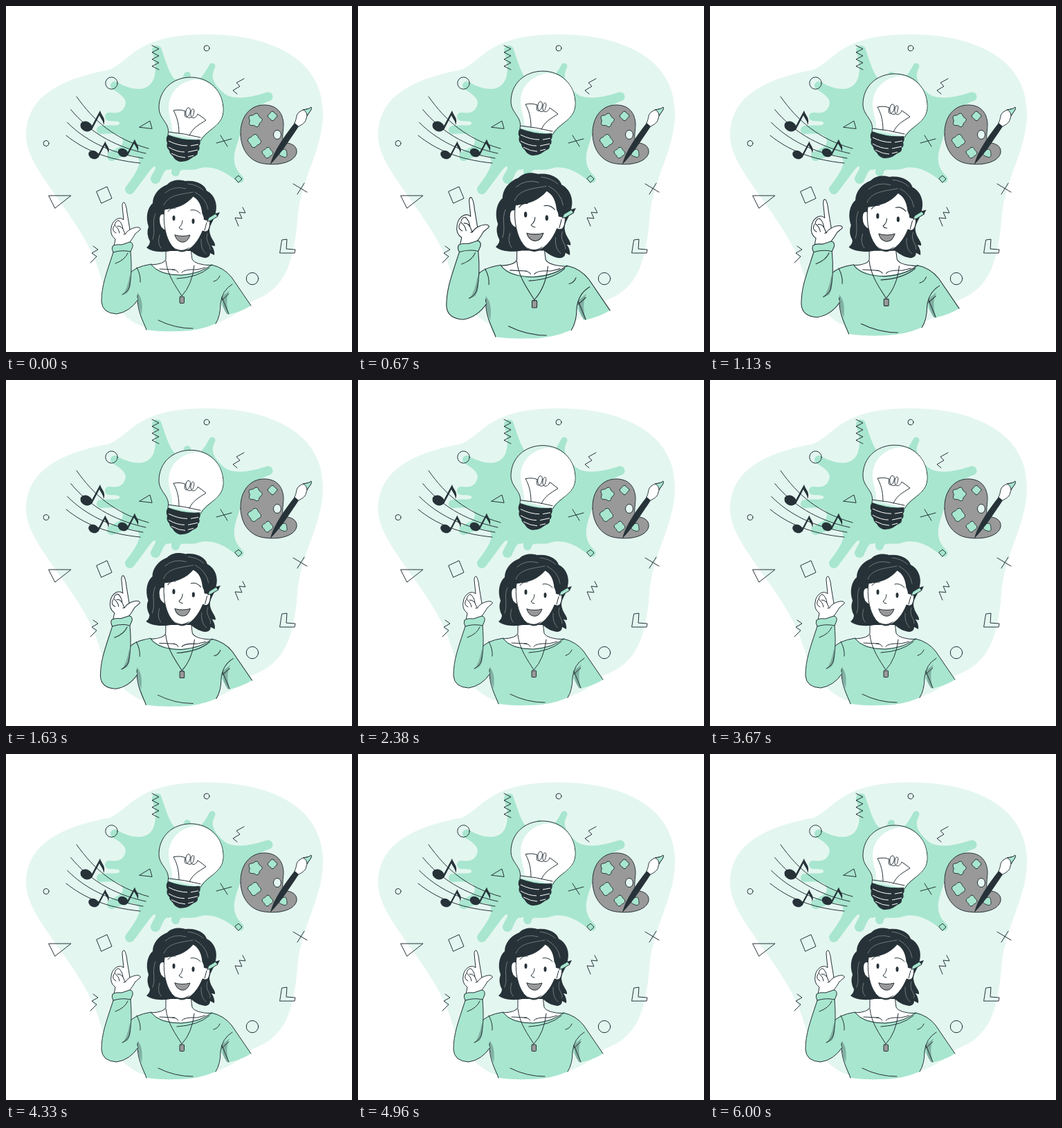
Animation of 500 by 500 pixels, one loop 6040 ms. Source, as an HTML page:

```html
<!DOCTYPE html>
<html lang="en">
<head>
<meta charset="utf-8">
<title>Creative idea</title>
<style>
  html, body { margin: 0; width: 100%; height: 100%; overflow: hidden; background: #fff; }
  svg { display: block; width: 100vw; height: 100vh; }
  .line, .skin, .mint, .gray { stroke: #263238; stroke-width: 1; stroke-linecap: round; stroke-linejoin: round; }
  .line { fill: none; }
  .skin { fill: #fff; }
  .mint { fill: #a8e6cf; }
  .gray { fill: #999; }
  .bare { stroke: none; }
  .dark { fill: #263238; }
  .pale { fill: #e4f6f0; }
  .shade { fill: #263238; opacity: .3; }
  .shine { fill: none; stroke: #8d9699; stroke-width: .7; stroke-linecap: round; }
</style>
</head>
<body>
<svg viewBox="0 0 500 500">
  <defs>
    <g id="note">
      <ellipse rx="9" ry="7" transform="rotate(28)"/>
      <path d="M6 3L20 -23C22 -15 29 -12 25 -2C25 -8 21 -11 19 -16L8 5z"/>
    </g>
  </defs>

  <path class="pale" d="M29 187C29 130 80 105 150 92C185 75 190 41 290 41C380 41 458 75 458 155C458 210 425 250 421 310C415 380 400 410 355 427C310 472 215 485 175 450C145 425 140 400 128 365C95 290 29 235 29 187z"/>
  <path id="splash" class="mint bare"/>

  <g class="line">
    <path id="zigzag"/>
    <path d="M344 105l-11 6 5 5-10 6 6 5"/>
    <path d="M342 291l4 8-9-1 4 9-10-1 5 12"/>
    <path d="M126 347l7 5-9 5 7 5-9 9"/>
    <path d="M62 274h32l-23 18zM193 175l15-9 3 11zM131 268l15-7 7 17-15 7zM331 249l5-4 5 5-5 5z"/>
    <path d="M304 198l22-6M310 187l10 16M415 257l20 12M431 256l-10 16"/>
    <path d="M399 338l7-1-1 14 13 1-1 5h-21z"/>
    <circle cx="290" cy="61" r="4"/>
    <circle cx="152.500" cy="111.500" r="8.700"/>
    <circle cx="58" cy="198.500" r="4"/>
    <circle cx="356" cy="394" r="8.700"/>
    <path id="staff"/>
  </g>

  <g class="dark">
    <use href="#note" transform="translate(116 174)"/>
    <use href="#note" transform="translate(126.500 215) scale(.85)"/>
    <use href="#note" transform="translate(169 212) scale(.85)"/>
  </g>

  <path class="gray" d="M339 186C338 160 353 143 373 143C391 143 400 154 401 170C401 185 396 196 406 198C416 199 421 205 420 212C418 221 408 226 396 228C389 229 382 229 374 228C354 226 340 210 339 186z"/>
  <path id="paints" class="mint"/>
  <ellipse class="line" cx="392" cy="186" rx="5.500" ry="6.500" style="fill:#e4f6f0"/>
  <path class="dark" d="M417 169L423 174C411 192 397 214 382 229C386 211 403 187 417 169z"/>
  <path class="skin" d="M417 169C421 162 418 158 424 153C431 148 436 150 441 147C442 151 436 155 434 162C433 169 428 171 423 174z"/>
  <path class="mint" d="M430 150C435 149 438 149 441 146C443 150 437 154 435 159C435 155 433 152 430 150z"/>

  <g id="bulb">
    <path class="line" style="fill:#d9f4ea" d="M234 186C238 169 221 164 221 147C221 121 241 103 267 103C294 103 314 123 314 150C314 174 291 177 281 195"/>
    <path fill="#fff" d="M240 181C241 168 235 162 235 146C236 123 253 108 276 106C299 109 313.500 126 313.500 150C313.500 174 291 177 281 192Q259 190 240 181z"/>
    <path class="line" d="M235 182Q257 184 281 190M250 184C250 168 246 158 242 151Q252 149 259 152C256 164 264 162 266 154C268 145 261 145 260 152C258 164 270 164 271 156C274 147 268 147 267 154C266 165 275 163 277 156Q283 160 289 165C278 172 270 176 265 187"/>
    <path class="dark" d="M234 186Q257 195 280 193Q282 198 279 202Q281 207 277 210Q278 215 273 217C266 220 265 225 251 225Q244 223 241 217Q236 213 236 209Q231 204 233 198Q230 192 234 186z"/>
    <path fill="none" stroke="#fff" d="M235 195Q249 202 262 202M267 202L278 200M235 204Q247 211 258 211M263 211L277 208M239 213Q250 219 259 219M263 218L271 216"/>
  </g>

  <g id="woman">
    <!-- torso and right sleeve -->
    <path class="mint bare" d="M178 388Q184 377 210 373H297Q315 378 326 392L354 433Q340 442 320 446L310 430Q309 449 303 459Q275 471 245 470Q224 471 203 468Q192 450 190 424L174 414z"/>
    <path class="shade" d="M190 414C198 423 197 436 196 446Q189 431 190 414zM312 420L323 411Q316 425 322 445L319 445Q312 435 312 420z"/>
    <path class="line" d="M178 388Q184 377 210 373M297 374Q315 378 326 392L354 433M190 418C189 441 198 454 203 468M327 402Q312 411 310 430Q310 448 303 459M312 421L322 445M312 425L322 416M220 454Q244 466 270 466M189 378Q195 389 194 399M300 398Q306 397 309 390"/>

    <!-- neck and necklace -->
    <path class="skin bare" d="M231 345V366Q229 373 210 374Q225 388 254 388Q282 385 297 374Q273 373 269 366L267 345z"/>
    <path class="line" d="M231 350V366Q229 373 210 374M267 350L269 366Q273 374 297 375M210 374Q221 389 253 389Q281 387 297 374M247 394Q278 392 294 378M240 381Q247 381 249 385M222 380L244 381M254 385Q258 380 276 381L288 378"/>
    <path class="line" d="M231 368C233 389 246 406 254 419Q269 403 272 375"/>
    <rect class="gray" x="251" y="420" width="6.500" height="9.500" rx="1"/>

    <!-- hair behind the face -->
    <path class="dark" d="M233 258C241 250 252 251 259 253C276 251 288 259 290 267C302 273 306 287 303 298C302 309 294 315 294 325C295 336 303 341 302 347L297 346Q302 353 301 360L295 357Q295 363 288 364C280 363 274 360 267 354L238 354C222 357 208 354 203 349Q208 345 208 340Q202 329 206 319C201 304 205 291 212 285C212 274 220 263 233 258z"/>
    <path class="shine" d="M216 300C210 313 217 323 212 337M222 331Q218 342 224 350M291 329C287 340 296 345 295 352M282 337Q281 352 289 358"/>

    <!-- face -->
    <path class="skin bare" d="M230 302Q222 298 222 309Q222 321 231 324z"/>
    <path class="skin" d="M229 294C227 309 229 328 236 341Q243 354 254 355C267 354 278 340 284 325Q292 329 294 319Q297 305 288 309L284 300C282 282 276 278 267 273Q252 292 229 294z"/>
    <ellipse class="dark" cx="242.500" cy="306.500" rx="2" ry="3.700"/>
    <ellipse class="dark" cx="270.500" cy="311" rx="2" ry="3.700"/>
    <path class="line" d="M234 297Q238 291 245 292M267 295Q275 293 281 300M255 310Q255 316 250 320Q251 323 255 323M287 324L290 313"/>
    <path class="gray" d="M244 331Q255 334 266 331Q262 343 253 341Q246 339 244 331z"/>
    <path class="dark" d="M243 349Q254 357 266 348Q255 361 243 349z"/>

    <!-- fringe and pencil -->
    <path class="dark" d="M220 300C218 278 230 261 247 258C272 255 290 268 291 279Q301 291 291 310L286 309C285 294 280 281 271 275C260 288 246 293 232 293Q226 295 220 300z"/>
    <path class="shine" d="M228 288C234 274 247 273 270 269M230 270Q243 259 260 264M273 269Q289 277 292 294M263 257Q276 258 285 266"/>
    <path class="mint" d="M291 311L293 306L303 300L306 304L296 310z"/>
    <path class="dark" d="M302 300L309 298L306 304z"/>

    <!-- raised hand and sleeve -->
    <path class="skin" d="M156 347L158 337Q150 331 152 321Q153 312 160 308Q166 305 170 309L168 289Q168 283 171 284Q174 288 175 299L179 323Q187 319 192 320Q196 322 193 324L187 329Q183 336 179 341V347z"/>
    <path class="line" d="M157 317Q158 310 163 310Q168 314 169 322M161 318Q168 317 171 327Q173 330 170 330M157 317Q163 321 164 328M156 318Q152 325 159 328M179 323Q174 326 172 330"/>
    <path class="mint bare" d="M155 356Q152 351 154 347Q158 344 167 345L179 341Q184 342 183 348L180 355C182 377 181 391 178 407L191 424Q179 442 160 445Q139 444 138 427Q138 404 155 356z"/>
    <path class="shade" d="M179 388Q183 403 176 414L168 418Q176 408 179 388z"/>
    <path class="line" d="M155 356Q152 351 154 347Q158 344 167 345L179 341Q184 342 183 348L180 355Q168 352 155 356C145 387 138 404 138 427Q139 444 160 445Q179 442 191 424M180 355C182 376 181 394 178 407Q175 414 168 417M158 372Q172 367 176 357"/>
  </g>
</svg>
<script>
const LOOP = 6040, CYCLE = 6000, FLOAT = 1500, STEP = 1000 / 24, TAU = 2 * Math.PI;
const el = id => document.getElementById(id);
const setPath = (id, d) => el(id).setAttribute('d', d);
const range = n => [...Array(n).keys()];

// Round-tipped arms pointing away from an elliptical core; arms go clockwise.
function splashPath(cx, cy, rx, ry, arms) {
  const angles = arms.map(([x, y]) => Math.atan2((y - cy) / ry, (x - cx) / rx));
  const valley = i => {
    const a = angles[i], b = angles[(i + 1) % arms.length];
    const mid = a + (b - a + TAU) % TAU / 2, c = Math.cos(mid), s = Math.sin(mid);
    const reach = Math.min(16, Math.abs((b - a + TAU) % TAU) * 18);
    return { x: cx + rx * c, y: cy + ry * s, tx: -s * reach, ty: c * reach };
  };
  return arms.map(([x, y, r], i) => {
    const from = valley((i + arms.length - 1) % arms.length), to = valley(i);
    const dir = Math.atan2(y - cy, x - cx), ux = Math.cos(dir), uy = Math.sin(dir);
    const base = Math.hypot((from.x + to.x) / 2 - x, (from.y + to.y) / 2 - y) * .6;
    const left = [x + uy * r, y - ux * r], right = [x - uy * r, y + ux * r];
    const inward = ([px, py]) => [px - ux * base, py - uy * base];
    return `${i ? 'L' : 'M'}${from.x} ${from.y}C${from.x + from.tx} ${from.y + from.ty} ${inward(left)} ${left}`
      + `A${r} ${r} 0 0 1 ${right}C${inward(right)} ${to.x - to.tx} ${to.y - to.ty} ${to.x} ${to.y}`;
  }).join('') + 'z';
}

function spotPath(x, y, r, lobes) {
  return 'M' + range(40).map(i => {
    const a = i / 40 * TAU, d = r * (1 + .13 * Math.sin(lobes * a + x));
    return [x + d * Math.cos(a), y + d * Math.sin(a)];
  }).join('L') + 'z';
}

function staffLine(i) {
  const x = 87 + 15 * (1 - i / 3) ** 2, y = 131 + 18.7 * i, endX = 206 - 4 * i, endY = 206 + 7 * i;
  return `M${x} ${y}C${x + 25} ${y + 35 - 5 * i} ${endX - 50} ${endY - 14 + 3 * i} ${endX} ${endY}`;
}

setPath('splash', splashPath(252, 172, 88, 66, [
  [157, 115, 6], [218, 64, 7], [262, 100, 5], [298, 87, 4.5], [379, 131, 6.5], [338, 250, 5.5],
  [245, 240, 6], [216, 250, 7], [179, 265, 7], [153, 217, 7], [137, 179, 6], [149, 160, 6]
]));
setPath('zigzag', 'M' + range(8).map(i => [211 + i % 2 * 10, 57 + i * 5]).join('L'));
setPath('staff', range(4).map(staffLine).join(''));
setPath('paints', spotPath(360, 165, 9, 5) + spotPath(385, 159, 6, 4) + spotPath(359, 195, 8.5, 4)
  + spotPath(378, 212, 7, 4) + spotPath(401, 213, 5.5, 3));

// Two linear beats: a quick rise with a slow fall, then an even one.
const pulse = p => Math.max(0, Math.min(p / .1, (.3 - p) / .2), 1 - Math.abs(p - .5) / .1);

function draw(ms) {
  const t = Math.min(CYCLE, Math.floor((ms % LOOP + 5) / STEP) * STEP);
  const lift = 10 * (1 - Math.abs(1 - 2 * (t % FLOAT / FLOAT)));
  const scale = 1 + .1 * pulse(t / CYCLE);
  el('bulb').setAttribute('transform', `translate(0 ${-lift})`);
  el('woman').setAttribute('transform', `translate(246 360.5) scale(${scale}) translate(-246 -360.5)`);
}

function tick() {
  draw(performance.now());
  requestAnimationFrame(tick);
}
tick();
</script>
</body>
</html>
```
